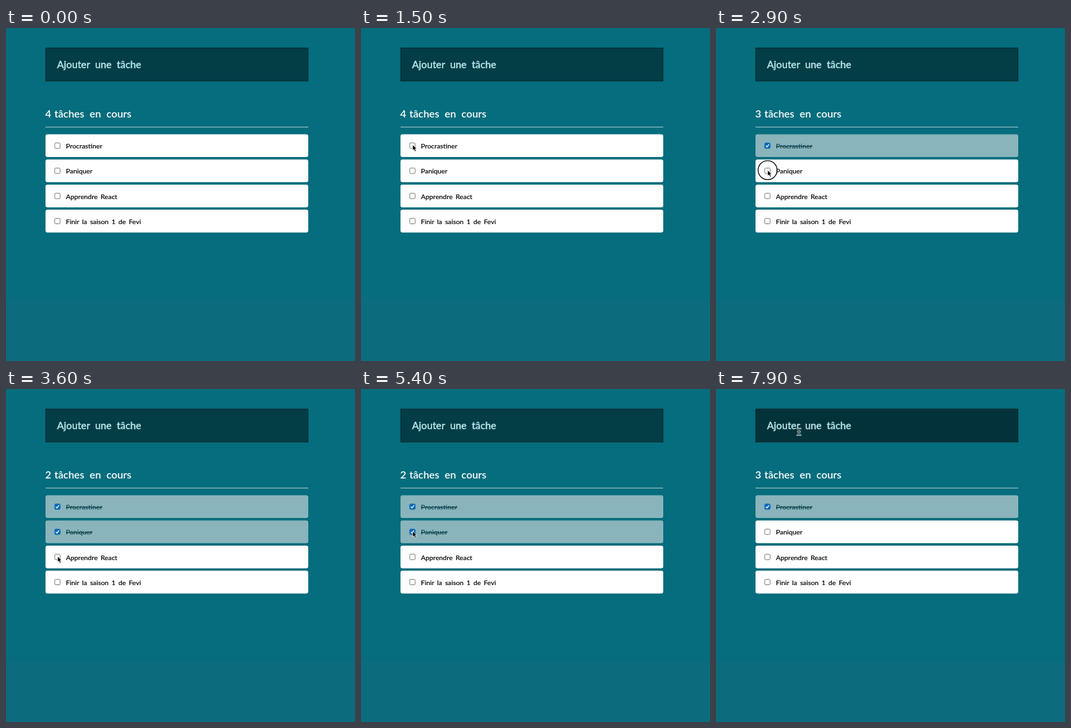
Recreate the animation shown at these times as an HTML page. Size 530x506 px, loop 8000 ms.

```html
<!DOCTYPE html>
<html lang="fr">
<head>
<meta charset="utf-8">
<title>Tâches</title>
<style>
html, body { margin: 0; width: 100%; height: 100%; overflow: hidden; background: #056d7d; }
svg { display: block; width: 530px; height: 506px; font-family: Lato, "Open Sans", sans-serif; }
.field { fill: #033d46; stroke: #042f37; stroke-width: 1.3; }
.focused .field { fill: #03323a; stroke: #032d34; }
.prompt { font-size: 15.2px; font-weight: 500; word-spacing: .27em; fill: #b9e6e9; stroke: #b9e6e9; stroke-width: .35; }
.heading { font-size: 15.8px; font-weight: 600; word-spacing: .27em; fill: #fff; }
.item { font-size: 10.3px; font-weight: 500; word-spacing: .18em; fill: #000; stroke: #000; stroke-width: .12; }
.card { fill: #fff; }
.box { fill: #fff; stroke: #6d6d6d; stroke-width: .9; }
.tick { fill: none; stroke: #fff; stroke-width: 1.3; visibility: hidden; }
.done .card { fill: #89b4bb; }
.done .item { fill: #053b47; stroke: none; text-decoration: line-through; }
.done .box { fill: #0869b8; stroke: #0869b8; }
.done .tick { visibility: visible; }
</style>
</head>
<body>
<svg id="stage" viewBox="0 0 530 506">
  <rect width="530" height="506" fill="#056d7d"/>
  <rect y="412" width="530" height="94" fill="#0b6c7e"/>
  <rect class="field" x="60.5" y="30.5" width="398" height="50"/>
  <text class="prompt" x="77.5" y="60.5">Ajouter une tâche</text>
  <text class="heading" id="count" x="59.5" y="136"></text>
  <text class="heading" x="73.4" y="136">tâches en cours</text>
  <rect x="60" y="150" width="399" height="1" fill="#a3cbd1"/>
  <g id="list"></g>
  <g id="pointer">
    <circle id="ring" r="14.4" fill="none" stroke="#0a0f11" stroke-width="1.3"/>
    <path id="arrow" d="M0 0V8.8L2 7L3.5 10.3L5.2 9.5L3.8 6.4H6.4Z" fill="#000" stroke="#fff" stroke-width=".7"/>
    <g id="beam" fill="none" stroke-linecap="round">
      <path id="stem" d="M-2.4 -5Q0 -5 0 -2.5Q0 -5 2.4 -5M0 -2.5V2.5M-2.4 5Q0 5 0 2.5Q0 5 2.4 5M-1.5 0H1.5" stroke-width="1"/>
    </g>
  </g>
</svg>
<script>
const LOOP = 8000, STEP = 100, APPEAR = 300;
const $ = id => document.getElementById(id);
const show = (el, on) => el.setAttribute('visibility', on ? 'inherit' : 'hidden');

const tasks = ['Procrastiner', 'Paniquer', 'Apprendre React', 'Finir la saison 1 de Fevi'];
const rowPitch = 38.2;

// The pointer rests on its aim for SETTLE ms, then the click takes effect.
const SETTLE = 500;
const entry = { x: 470, y: 280 }, field = { x: 126, y: 65 };
const aimAt = row => ({ row, x: 78.4, y: 177.3 + row * 38.7 });
const clicks = [
  { at: 2000, ...aimAt(0) },
  { at: 3000, ...aimAt(1) },
  { at: 4400, ...aimAt(2) },
  { at: 5000, ...aimAt(2) },
  { at: 5900, ...aimAt(1) },
  { at: 7100, ...field }
];

$('stem').setAttribute('stroke', '#102b31');
const halo = $('stem').cloneNode();
halo.removeAttribute('id');
halo.setAttribute('stroke', '#d5e4e6');
halo.setAttribute('stroke-width', 2.6);
$('beam').prepend(halo);

$('list').innerHTML = tasks.map((name, i) => `
  <g transform="translate(60 ${161.5 + i * rowPitch})">
    <rect class="card" width="399" height="34.6" rx="3"/>
    <rect class="box" x="14" y="13.2" width="8.2" height="8.2" rx="1.5"/>
    <path class="tick" d="M15.8 17.4L17.5 19.3L20.5 15.1"/>
    <text class="item" x="31" y="21.8">${name}</text>
  </g>`).join('');
const rows = [...$('list').children];

const easeOut = k => 1 - (1 - k) ** 4;

// Travel starts at the previous click and ends SETTLE ms before the next one.
function position(t) {
  const next = clicks.findIndex(c => c.at > t);
  if (next < 0) return field;
  const from = clicks[next - 1] || { at: APPEAR, ...entry };
  const to = clicks[next];
  const span = Math.max(to.at - SETTLE - from.at, STEP);
  const k = easeOut(Math.min(Math.max((t - from.at) / span, 0), 1));
  return { x: from.x + (to.x - from.x) * k, y: from.y + (to.y - from.y) * k };
}

function draw(t) {
  const past = clicks.filter(c => c.at <= t);
  const done = tasks.map((_, i) => past.filter(c => c.row === i).length % 2 === 1);
  rows.forEach((row, i) => row.classList.toggle('done', done[i]));
  $('count').textContent = done.filter(d => !d).length;
  $('stage').classList.toggle('focused', past.length === clicks.length);

  const { x, y } = position(t), overField = y < 82;
  $('pointer').setAttribute('transform', `translate(${x} ${y})`);
  show($('pointer'), t >= APPEAR);
  show($('arrow'), !overField);
  show($('beam'), overField);
  show($('ring'), clicks.some(c => t >= c.at - 200 && t < c.at + 200));
}

const start = performance.now();
function tick() {
  const t = (performance.now() - start) % LOOP;
  draw(Math.floor(t / STEP) * STEP);
  requestAnimationFrame(tick);
}
tick();
</script>
</body>
</html>
```
